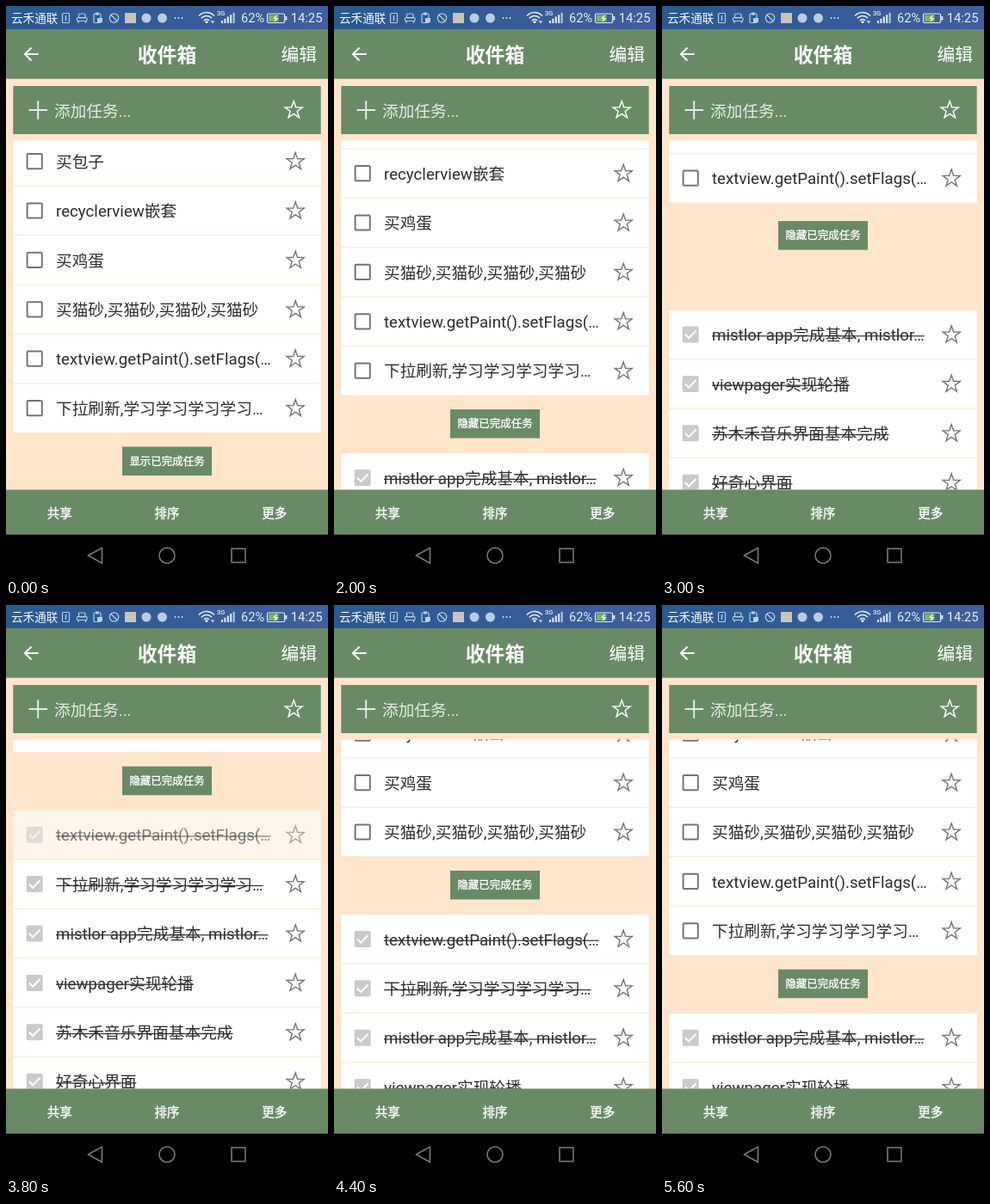
These frames come from a looping animation (374 by 664 pixels, 6.4 s). An HTML page with a canvas:

```html
<!DOCTYPE html>
<html lang="zh-CN">
<head>
<meta charset="utf-8">
<title>收件箱</title>
<style>
html, body { margin: 0; width: 100%; height: 100%; overflow: hidden; background: #000; }
canvas { display: block; width: 374px; height: 664px; }
</style>
</head>
<body>
<canvas id="stage"></canvas>
<script>
const W = 374, H = 664, LOOP = 6400, STEP = 100;
const FONT = 'Roboto, "Noto Sans CJK SC", "Noto Sans CJK", sans-serif';
const GREEN = '#688b66', SAND = '#ffe5c9', GREY = '#747474';
const PITCH = 57.4, ROW_H = 56.4, TOP = 152.4, DONE_GAP = 67;

const tasks = [
  '买包子',
  'recyclerview嵌套',
  '买鸡蛋',
  '买猫砂,买猫砂,买猫砂,买猫砂',
  'textview.getPaint().setFlags(…',
  '下拉刷新,学习学习学习学习…',
  'mistlor app完成基本, mistlor…',
  'viewpager实现轮播',
  '苏木禾音乐界面基本完成',
  '好奇心界面'
];

// Tasks before the open count are pending, the rest are done.
const toggles = [
  { at: 2738, slide: 200, from: 6, to: 5 },
  { at: 3438, slide: 200, from: 5, to: 4 },
  { at: 4638, slide: 100, from: 4, to: 5 },
  { at: 5238, slide: 100, from: 5, to: 6 }
];

const canvas = document.getElementById('stage');
const ctx = canvas.getContext('2d');
const dpr = window.devicePixelRatio || 1;
canvas.width = W * dpr;
canvas.height = H * dpr;

const barFill = ctx.createLinearGradient(0, 0, W, 0);
barFill.addColorStop(0, '#28598f');
barFill.addColorStop(1, '#405f9e');

const clamp = v => Math.max(0, Math.min(1, v));
const lerp = (a, b, u) => a + (b - a) * u;
const easeOut = (u, n) => 1 - Math.pow(1 - clamp(u), n);
const smooth = u => (1 - Math.cos(Math.PI * u)) / 2;

function box(x, y, w, h, color) {
  ctx.fillStyle = color;
  ctx.fillRect(x, y, w, h);
}

function label(str, x, y, size, color, align = 'left', weight = 400) {
  ctx.font = `${weight} ${size}px ${FONT}`;
  ctx.textAlign = align;
  ctx.fillStyle = color;
  ctx.fillText(str, x, y);
}

// White caption, slightly heavier than regular.
function caption(str, x, y, size) {
  label(str, x, y, size, '#fff', 'center');
  ctx.strokeStyle = '#fff';
  ctx.lineWidth = 0.35;
  ctx.strokeText(str, x, y);
}

function line(points, color, width, close) {
  ctx.beginPath();
  points.forEach(([x, y]) => ctx.lineTo(x, y));
  if (close) ctx.closePath();
  ctx.strokeStyle = color;
  ctx.lineWidth = width;
  ctx.stroke();
}

function ring(x, y, r, color, width, a = 0, b = Math.PI * 2) {
  ctx.beginPath();
  ctx.arc(x, y, r, a, b);
  ctx.strokeStyle = color;
  ctx.lineWidth = width;
  ctx.stroke();
}

function disc(x, y, r, color) {
  ctx.beginPath();
  ctx.arc(x, y, r, 0, Math.PI * 2);
  ctx.fillStyle = color;
  ctx.fill();
}

function frame(x, y, w, h, color, width, r = 0) {
  ctx.beginPath();
  ctx.roundRect(x, y, w, h, r);
  ctx.strokeStyle = color;
  ctx.lineWidth = width;
  ctx.stroke();
}

function star(x, y, color) {
  const pts = [];
  for (let i = 0; i < 10; i++) {
    const r = i % 2 ? 4.2 : 10.6, a = -Math.PI / 2 + i * Math.PI / 5;
    pts.push([x + r * Math.cos(a), y + r * Math.sin(a)]);
  }
  line(pts, color, 1.4, true);
}

function checkbox(x, y, done) {
  if (!done) return frame(x - 8.6, y - 8.6, 17.2, 17.2, GREY, 2, 1.2);
  ctx.beginPath();
  ctx.roundRect(x - 9.5, y - 9.5, 19, 19, 2);
  ctx.fillStyle = '#cacaca';
  ctx.fill();
  line([[x - 6.2, y], [x - 2.1, y + 4.3], [x + 6.4, y - 4.4]], '#fff', 2.1);
}

function row(i, done, scroll, alpha = 1) {
  const y = TOP + PITCH * i + (done ? DONE_GAP : 0) - scroll;
  if (alpha <= 0 || y > 563 || y < 100) return;
  const mid = y + 28.2;
  ctx.globalAlpha = alpha;
  box(8.3, y, 357.4, ROW_H, '#fff');
  checkbox(33.2, mid, done);
  label(tasks[i], 58, mid + 7.2, 18.7, '#2d2d2d');
  if (done) box(58, mid + 1.2, ctx.measureText(tasks[i]).width, 1.2, '#2d2d2d');
  star(336.2, mid + 0.4, GREY);
  ctx.globalAlpha = 1;
}

function scrollAt(t) {
  const up = 210 * easeOut((t - 1950) / 550, 2.43);
  return up - 121.2 * easeOut((t - 3950) / 450, 1.38);
}

function list(t) {
  const scroll = scrollAt(t);
  const ev = toggles.filter(e => e.at <= t).pop() || { at: -1e4, slide: 0, from: 6, to: 6 };
  const age = t - ev.at;
  const fadeOut = 1 - clamp(age / 100);
  const slide = smooth(clamp((age - 100) / (ev.slide || 1)));
  const fadeIn = clamp((age - 100 - ev.slide) / 100);
  const moving = ev.from === ev.to ? -1 : Math.min(ev.from, ev.to);

  ctx.save();
  ctx.beginPath();
  ctx.rect(0, 156.5, W, 406);
  ctx.clip();
  tasks.forEach((_, i) => {
    if (i === moving) {
      row(i, i >= ev.from, scroll, fadeOut);
      row(i, i >= ev.to, scroll, fadeIn);
    } else {
      row(i, i >= ev.to, scroll);
    }
  });
  const y = TOP + PITCH * lerp(ev.from, ev.to, slide) + 15.7 - scroll;
  box(135, y, 104, 33.5, GREEN);
  caption((t < 1600 ? '显示' : '隐藏') + '已完成任务', 187, y + 21.4, 12.46);
  ctx.restore();
}

function statusBar(t) {
  const ink = '#e4edf6', dim = '#b9cce2';
  box(0, 0, W, 27, barFill);
  label('云禾通联', 6, 19, 13.6, '#f4f8fc');

  frame(65.5, 8.5, 8, 11, dim, 1.2, 1);
  line([[69.5, 11], [69.5, 17]], dim, 1.4);

  frame(84.5, 9, 7.5, 5, dim, 1.2, 1);
  frame(82.5, 13.5, 11.5, 4, dim, 1.2, 1);
  line([[84, 18], [84, 20]], dim, 1.3);
  line([[92.5, 18], [92.5, 20]], dim, 1.3);

  frame(102, 9, 8, 10.5, dim, 1.2, 1);
  box(104, 7.5, 4, 3, dim);
  box(106, 14, 6, 5, dim);

  ring(125.5, 14, 5.2, dim, 1.3);
  line([[122, 10.5], [129, 17.5]], dim, 1.3);

  box(138, 8, 13, 12, '#c9c3bb');
  disc(163, 14, 5.5, dim);
  disc(181.5, 14, 5.5, dim);
  [196.5, 200.5, 204.5].forEach(x => disc(x, 14, 0.9, ink));

  [4, 8, 12].forEach(r => ring(233, 19.5, r, ink, 1.6, -Math.PI * 0.77, -Math.PI * 0.23));
  disc(233, 18.5, 1.6, ink);
  if (t < 4700) line([[238.5, 17], [240, 19.5], [241.5, 17]], ink, 1.1);

  label('3G', 245, 10.5, 7.5, ink, 'left', 500);
  for (let i = 0; i < 5; i++) box(250 + i * 3.4, 17 - i * 2.3, 2, 3 + i * 2.3, i < 4 ? ink : dim);

  label('62%', 273, 19.3, 14.6, ink);
  frame(303.5, 9, 20, 10.5, ink, 1.2, 1.5);
  box(324.3, 12, 2, 4.5, ink);
  box(305, 10.5, 11.5, 7.5, '#79b94e');
  line([[314.5, 10.5], [311.5, 14.5], [315, 14.5], [312, 18]], '#fff', 1.2);
  label('14:25', 367.5, 19.3, 14.8, ink, 'right');
}

function header() {
  box(0, 27, W, 57.7, GREEN);
  line([[37.5, 56], [22, 56]], '#fff', 2);
  line([[29.5, 48.5], [22, 56], [29.5, 63.5]], '#fff', 2);
  label('收件箱', 187, 64.5, 22.8, '#fff', 'center', 700);
  label('编辑', 361, 64.3, 20.8, '#fff', 'right');

  box(8.3, 93, 357.4, 56, GREEN);
  line([[26.5, 121], [48, 121]], '#e9efe8', 1.9);
  line([[37.2, 110.2], [37.2, 131.8]], '#e9efe8', 1.9);
  label('添加任务...', 56, 129, 18.7, '#e6ece5');
  star(334.2, 121.2, '#fff');
}

function footer() {
  box(0, 562.5, W, 52, GREEN);
  [['共享', 62.3], ['排序', 187], ['更多', 311.7]].forEach(([s, x]) => caption(s, x, 594.5, 14.5));
  box(0, 614.5, W, 49.5, '#000');
  line([[95.5, 639], [111.5, 630], [111.5, 648]], '#7d7d7d', 1.5, true);
  ring(187, 639, 9, '#7d7d7d', 1.5);
  frame(262, 631, 16, 16, '#7d7d7d', 1.5);
}

function draw(now) {
  const t = Math.floor((now % LOOP) / STEP) * STEP;
  ctx.setTransform(dpr, 0, 0, dpr, 0, 0);
  box(0, 0, W, H, SAND);
  list(t);
  statusBar(t);
  header();
  footer();
}

let start;
function tick(now) {
  if (start === undefined) start = now;
  draw(Math.max(0, now - start));
  requestAnimationFrame(tick);
}
draw(0);
requestAnimationFrame(tick);
</script>
</body>
</html>
```
